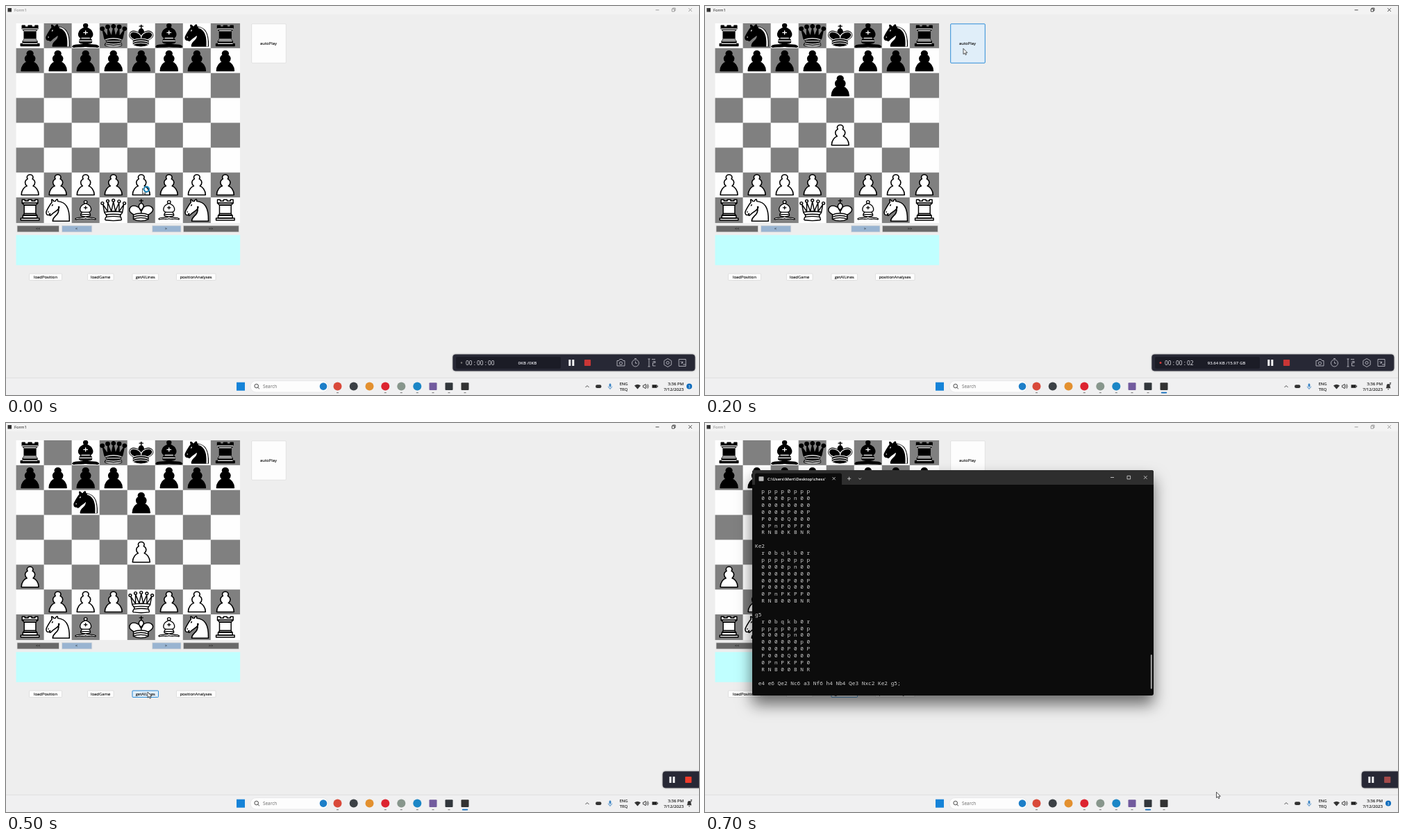
Write an HTML page that moves like this. It is 998x561 px and loops after 800 ms.

```html
<!DOCTYPE html>
<html lang="en">
<head>
<meta charset="utf-8">
<title>Form1</title>
<style>
  html, body { margin: 0; width: 100%; height: 100%; overflow: hidden; background: #eee; }
  svg { display: block; }
  text { font: 5.9px "Open Sans", "Noto Sans", sans-serif; fill: #111; white-space: pre; }
  .mid { text-anchor: middle; }
  .end { text-anchor: end; }
  .label { stroke: #111; stroke-width: .12; }
  .small { font-size: 6.1px; }
  .line { fill: none; stroke: #222; stroke-width: .8; }
  .btn { fill: #fdfdfd; stroke: #d2d2d2; stroke-width: .6; }
  .hot { fill: #e0eef9; stroke: #0078d4; stroke-width: .8; }
  .focus { fill: none; stroke: #0078d4; stroke-width: .6; }
  .inner { fill: none; stroke: #f4f8fc; stroke-width: .6; }
  .dark { fill: #696969; }
  .blue { fill: #99b4d1; }
  .bar { fill: #272835; stroke: #4a4b55; stroke-width: .4; filter: drop-shadow(0 .5px 1px rgba(0,0,0,.4)); }
  .tool { fill: none; stroke: #c9cad2; stroke-width: .8; }
  .bar-text { fill: #e8e8ee; font-size: 6.1px; font-weight: 600; text-anchor: middle; }
  .clock { fill: #e8e8ee; font-size: 8.3px; }
  .piece { stroke: #000; stroke-width: 1.5; stroke-linecap: round; stroke-linejoin: round; }
  .white { fill: #fff; }
  .black { fill: #000; }
  .trim { fill: none; }
  .black .trim { stroke: #fff; stroke-width: 1.2; }
  .black .glint { fill: #fff; stroke: none; }
  .white .glint { display: none; }
  .term { filter: drop-shadow(0 13px 11px rgba(0,0,0,.55)); }
  .term .line { stroke: #ddd; }
  .term .tab { fill: #fff; font-weight: 600; font-size: 5.8px; }
  #output text { font: 7.78px "Noto Sans Mono", "DejaVu Sans Mono", monospace; fill: #d2d2d2; }
</style>
</head>
<body>
<svg width="998" height="561" viewBox="0 0 998 561">
  <defs>
    <path id="arrow" d="M0 0V8.2L1.9 6.5 3.2 9.3 4.5 8.7 3.3 6H5.8Z" fill="#fff" stroke="#111" stroke-width=".7"/>
    <path id="pause" d="M-4-4.5h3v9h-3zM1-4.5h3v9h-3z" fill="#f4f4f6"/>
    <rect id="stop" x="-4.6" y="-4.5" width="9.2" height="9" rx=".8"/>
    <g id="camera" class="tool"><path d="M-5.5-3h2.5l1.3-2h3.4l1.3 2h2.5v7.5h-11z"/><circle cy=".7" r="2.1"/></g>
    <g id="timer" class="tool"><circle cy=".5" r="5"/><path d="M0-2V.7H2.4M-1.5-6H1.5"/></g>
    <path id="controls" d="M935.5 5.8h5M983 3.2l4.8 4.8M987.8 3.2L983 8M959 4.2h3.7v3.7H959zM960.2 4V3h3.7v3.7h-1"/>
  </defs>

  <rect width="998" height="561" fill="#eee"/>
  <rect width="998" height="12" fill="#f3f3f3"/>
  <rect x="2.5" y="3" width="5.5" height="5.5" fill="#333"/>
  <g data-on="017"><text x="12" y="8" style="fill:#777">Form1</text><use href="#controls" class="line" style="stroke:#888"/></g>
  <g data-on="23456"><text x="12" y="8">Form1</text><use href="#controls" class="line"/></g>

  <g id="board"></g>

  <rect class="btn" x="353.7" y="25.8" width="49.6" height="56.4" rx="1"/>
  <rect class="hot" data-on="2" x="353.7" y="25.8" width="49.6" height="56.4" rx="1"/>
  <text class="mid label" x="378" y="56.2">autoPlay</text>

  <g stroke="#dcdcdc" stroke-width=".8">
    <rect class="dark" x="16" y="316.8" width="60.5" height="9.2"/>
    <rect class="blue" x="80.5" y="316.8" width="43.3" height="9.2"/>
    <rect class="blue" x="210.7" y="316.8" width="41.3" height="9.2"/>
    <rect class="dark" x="255.3" y="316.8" width="80" height="9.2"/>
  </g>
  <g data-on="3">
    <rect class="focus" x="15.6" y="316.1" width="61.8" height="10.6" rx="1"/>
    <rect class="inner" x="16.3" y="316.8" width="60.4" height="9.2"/>
  </g>
  <g data-on="4">
    <rect class="focus" x="209.9" y="316.1" width="43" height="10.6" rx="1"/>
    <rect class="inner" x="210.6" y="316.8" width="41.6" height="9.2"/>
  </g>
  <text class="mid" x="46" y="323.4">&lt;&lt;</text>
  <text class="mid" x="101.5" y="323.4">&lt;</text>
  <text class="mid" x="230.5" y="323.4">&gt;</text>
  <text class="mid" x="295" y="323.4">&gt;&gt;</text>
  <rect x="14.5" y="330.3" width="322.7" height="43.4" fill="#c0ffff"/>

  <rect class="btn" x="33.5" y="386" width="47" height="9.5" rx="1"/>
  <rect class="btn" x="117.5" y="386" width="37.5" height="9.5" rx="1"/>
  <rect class="btn" x="182" y="386" width="37.5" height="9.5" rx="1"/>
  <rect class="btn" x="245.5" y="386" width="56.5" height="9.5" rx="1"/>
  <rect class="hot" data-on="5" x="182" y="386" width="37.5" height="9.5" rx="1"/>
  <rect class="focus" data-on="67" x="182" y="386" width="37.5" height="9.5" rx="1"/>
  <text class="mid label" x="57" y="392.8">loadPosition</text>
  <text class="mid label" x="136.2" y="392.8">loadGame</text>
  <text class="mid label" x="200.7" y="392.8">getAlLines</text>
  <text class="mid label" x="273.5" y="392.8">positionAnalyses</text>

  <!-- console window -->
  <g data-on="7">
    <g class="term">
      <rect x="68" y="68" width="578" height="325" rx="3" fill="#0c0c0c"/>
      <path d="M68 89V71q0-3 3-3H643q3 0 3 3V89Z" fill="#2e2e2e"/>
      <path d="M72 89V75q0-2.5 2.5-2.5H194.5q2.5 0 2.5 2.5V89Z" fill="#0c0c0c"/>
      <rect x="77.5" y="77.2" width="7" height="6.5" rx=".8" fill="#b8b8b8"/>
      <text class="tab" x="90" y="82.7">C:\Users\Mert\Desktop\chess'</text>
      <path class="line" d="M183.5 78l4.2 4.2M187.7 78l-4.2 4.2M205 80.2h5.2M207.6 77.6v5.2M221.3 79.5l1.8 1.8 1.8-1.8M584 78.5h5M608 76.3h4.6v4.6H608zM632 76.2l4.6 4.6M636.6 76.2L632 80.8"/>
      <rect x="641.8" y="334" width="2" height="49.5" rx="1" fill="#a0a0a0"/>
    </g>
    <g id="output"></g>
  </g>

  <!-- recorder bar -->
  <g data-on="0123">
    <rect class="bar" x="643.5" y="502.6" width="348.7" height="23.6" rx="4"/>
    <rect x="648" y="506" width="151" height="17" rx="2" fill="#1b1c26"/>
    <circle data-on="0" cx="656" cy="514.5" r="1.2" fill="#777"/>
    <circle data-on="123" cx="656" cy="514.5" r="1.5" fill="#d83a3a"/>
    <g id="status"></g>
    <use href="#pause" x="814.3" y="514.5"/>
    <use href="#stop" x="837.5" y="514.5" fill="#c93636"/>
    <use href="#camera" x="885.5" y="514.5"/>
    <use href="#timer" x="906.5" y="514.5"/>
    <path class="tool" d="M926 509v11M924.5 509h3M924.5 520h3M930 509.5h5M931.5 512.5h3.5v2h-3.5v4.5h4M953 508.5l5.2 3v6l-5.2 3-5.2-3v-6zM969 509.5h10v10h-10zM971.5 512l3 3M974.5 512.5v2.5h-2.5M975 517h4"/>
    <circle class="tool" cx="953" cy="514.5" r="2"/>
  </g>
  <g data-on="4">
    <rect class="bar" x="898.8" y="502.6" width="106" height="23.6" rx="4"/>
    <use href="#pause" x="912.5" y="514.5"/>
    <use href="#stop" x="936" y="514.5" fill="#ee3b2b"/>
    <use href="#camera" x="965" y="514.5"/>
    <use href="#timer" x="986" y="514.5"/>
  </g>
  <g data-on="567">
    <rect class="bar" x="945.8" y="502.6" width="60" height="23.6" rx="4"/>
    <use href="#pause" x="959.3" y="514.5"/>
    <use href="#stop" data-on="56" x="982.7" y="514.5" fill="#ee3b2b"/>
    <use href="#stop" data-on="7" x="982.7" y="514.5" fill="#a34a4a"/>
  </g>

  <!-- taskbar -->
  <rect y="536" width="998" height="25" fill="#f0f0f1"/>
  <path d="M0 536.3H998" stroke="#d9d9da" stroke-width=".7"/>
  <rect x="332" y="542.7" width="12" height="12" fill="#1583d8"/>
  <rect x="352" y="540.5" width="112" height="16.5" rx="8.2" fill="#fdfdfd" stroke="#e2e2e4" stroke-width=".7"/>
  <g class="line"><circle cx="360.7" cy="548" r="2.8"/><path d="M362.7 550l2.3 2.3"/></g>
  <text x="370" y="551" style="font-size:6.4px;fill:#666">Search</text>
  <circle cx="457" cy="548.6" r="5.3" fill="#1c7ec8"/>
  <g id="apps"></g>
  <rect data-on="23456" x="656.8" y="556.8" width="8.4" height="1.7" rx=".8" fill="#0f6cbd"/>
  <rect data-on="7" x="633.8" y="556.8" width="8.4" height="1.7" rx=".8" fill="#0f6cbd"/>

  <path class="line" d="M834.5 550l2.5-2.5 2.5 2.5"/>
  <rect x="849" y="546.3" width="8.5" height="4.8" rx="2.4" fill="#333"/>
  <rect x="868.6" y="544.5" width="2.8" height="5" rx="1.4" fill="#3a83c4"/>
  <path d="M867.3 548.5q0 2.8 2.7 2.8t2.7-2.8M870 551.3v1.7" class="line" style="stroke:#3a83c4"/>
  <text class="mid label" x="889.5" y="546.8">ENG</text>
  <text class="mid label" x="889.5" y="555">TRQ</text>
  <path d="M909.5 552.5l-4.5-5q4.5-3.6 9 0z" fill="#333"/>
  <path d="M917.5 547h1.5l2-2v7l-2-2h-1.5zM922.5 546.5q1.5 2 0 4M924 545.3q2.4 3.2 0 6.4" class="line"/>
  <path d="M930.5 546.3h7v4.5h-7zM938 547.5h1v2h-1z" fill="#222"/>
  <text class="end label small" x="976" y="546.8">3:36 PM</text>
  <text class="end label small" x="976" y="554.8">7/12/2023</text>
  <g data-on="07"><circle cx="984" cy="548.5" r="4" fill="#0f6cbd"/><text class="mid" x="984" y="550.5" style="fill:#fff;font-size:5.3px">3</text></g>
  <g data-on="123456"><path d="M980.5 551.3q1-1.2 1-3 0-3.3 2.5-3.3t2.5 3.3q0 1.8 1 3z" fill="#333"/><path class="line" d="M983 552.8h2M985.8 543.5h2l-2 2.2h2"/></g>

  <g id="cursors"></g>
</svg>
<script>
const $ = id => document.getElementById(id);

// Piece shapes on a 45-unit square; box is the inked area.
const dots = (r, list) => list.map(([x, y]) =>
  `M${x - r} ${y}a${r} ${r} 0 1 1 ${2 * r} 0a${r} ${r} 0 1 1 ${-2 * r} 0z`).join('');
const queenBase = 'M9 26c0 2 1.5 2 2.5 4 1 1.5 1 1 .5 3.5-1.5 1-1.5 2.5-1.5 2.5-1.5 1.5.5 2.5.5 2.5 6.5 1 16.5 1 23 0 0 0 1.5-1 0-2.5 0 0 .5-1.5-1-2.5-.5-2.5-.5-2 .5-3.5 1-2 2.5-2 2.5-4-8.5-1.5-18.5-1.5-27 0z';
const shapes = {
  p: { box: [10.25, 8.25, 24.5, 32],
    body: 'M22.5 9c-2.21 0-4 1.79-4 4 0 .89.29 1.71.78 2.38C17.33 16.5 16 18.59 16 21c0 2.03.94 3.84 2.41 5.03C15.41 27.09 11 31.58 11 39.5H34c0-7.92-4.41-12.41-7.41-13.47C28.06 24.84 29 23.03 29 21c0-2.41-1.33-4.5-3.28-5.62.49-.67.78-1.49.78-2.38 0-2.21-1.79-4-4-4z' },
  r: { box: [8.25, 8.25, 28.5, 31.5],
    body: 'M9 39h27v-3H9zM12 36v-4h21v4zM12.5 32l1.5-2.5h17l1.5 2.5zM14 29.5V17h17v12.5zM14 17l-3-3h23l-3 3zM11 14V9h4v2h5V9h5v2h5V9h4v5z',
    trim: 'M12 35.7h21M13 31.7h19M14 29.5h17M14 16.7h17M11 14h23' },
  n: { box: [5.25, 6.25, 33.5, 33.5],
    body: 'M22 10c10.5 1 16.5 8 16 29H15c0-9 10-6.5 8-21M24 18c.38 2.91-5.55 7.37-8 9-3 2-2.82 4.34-5 4-1.042-.94 1.41-3.04 0-3-1 0 .19 1.23-1 2-1 0-4.003 1-4-4 0-2 6-12 6-12s1.89-1.9 2-3.5c-.73-.994-.5-2-.5-3 1-1 3 2.5 3 2.5h2s.78-1.992 2.5-3c1 0 1 3 1 3',
    trim: 'M8.8 25.5h.4M14.2 16.3l.7-1.2',
    glint: 'M24.55 10.4l-.45 1.45.5.15c3.15 1 5.65 2.49 7.9 6.75S35.75 29.06 35.25 39l-.05.5h2.25l.05-.5c.5-10.06-.88-16.85-3.25-21.34-2.37-4.49-5.79-6.64-9.19-7.16z' },
  b: { box: [5.25, 4.75, 34.5, 35],
    body: 'M9 36c3.39-.97 10.11.43 13.5-2 3.39 2.43 10.11 1.03 13.5 2 0 0 1.65.54 3 2-.68.97-1.65.99-3 .5-3.39-.97-10.11.46-13.5-1-3.39 1.46-10.11.03-13.5 1-1.35.49-2.32.47-3-.5 1.35-1.94 3-2 3-2zM15 32c2.5 2.5 12.5 2.5 15 0 .5-1.5 0-2 0-2 0-2.5-2.5-4-2.5-4 5.5-1.5 6-11.5-5-15.5-11 4-10.5 14-5 15.5 0 0-2.5 1.5-2.5 4 0 0-.5.5 0 2z' + dots(2.5, [[22.5, 8]]),
    trim: 'M17.5 26h10M15 30h15M22.5 15.5v5M20 18h5' },
  q: { box: [2.5, 4.5, 40, 36],
    body: dots(2.75, [[6, 12], [14, 9], [22.5, 8], [31, 9], [39, 12]]) +
      'M9 26c8.5-1.5 21-1.5 27 0l2.5-12.5L31 25l-.3-14.1-5.2 13.6-3-14.5-3 14.5-5.2-13.6L14 25 6.5 13.5z' + queenBase,
    trim: 'M11 29a35 35 0 0 1 23 0M12.5 31.5h20M11.5 34.5a35 35 0 0 0 22 0M11 37.2a35 35 0 0 0 23 0' },
  Q: { box: [3.25, 4.75, 38.5, 35.25],
    body: dots(2, [[6, 12], [14, 8.5], [22.5, 7.5], [31, 9], [39, 12]]) +
      'M9 26c8.5-1.5 21-1.5 27 0l2-12-7 11V11l-5.5 13.5-3-15-3 15-5.5-14V25L7 14z' + queenBase,
    trim: 'M11.5 30c3.5-1 18.5-1 22 0M12 33.5c6-1 15-1 21 0' },
  k: { box: [4.8, 5.25, 35.4, 35.2],
    body: 'M22.5 11.63V6M20 8h5M22.5 25s4.5-7.5 3-10.5c0 0-1-2.5-3-2.5s-3 2.5-3 2.5c-1.5 3 3 10.5 3 10.5M11.5 37c5.5 3.5 15.5 3.5 21 0v-7s9-4.5 6-10.5c-4-6.5-13.5-3.5-16 4V27v-3.5c-3.5-7.5-13-10.5-16-4-3 6 5 10 5 10z',
    trim: 'M11.5 30c5.5-3 15.5-3 21 0M11.5 33.5c5.5-3 15.5-3 21 0M11.5 37c5.5-3 15.5-3 21 0',
    rim: 'M32 29.5s8.5-4 6.03-9.65C34.15 14 25 18 22.5 24.5v2.1-2.1C20 18 9.906 14 6.997 19.85c-2.497 5.65 4.853 9 4.853 9' }
};
// Place inside the square: x, y, width, height.
const fit = {
  p: [6.8, 3.2, 26.5, 30.3], P: [6.8, 2.3, 26.5, 30.8],
  r: [6, 2.5, 28, 30.7], R: [6, 2.4, 28, 31.3],
  n: [2.6, 1.4, 34.7, 32.3], N: [2.5, 1.9, 35, 33],
  b: [.5, 0, 39, 35.3], B: [4.5, 4, 31, 28.5],
  q: [.6, 1, 39, 33], Q: [1.5, 1.8, 37, 32.3],
  k: [2, 1.7, 36, 31.8], K: [2, 2.3, 36, 32.3]
};
const cellW = 40.04, cellH = 35.87;
const colX = c => 14.55 + cellW * c;
const rowY = r => 24.95 + cellH * r;

function pieceSvg(ch, r, c, on) {
  const low = ch.toLowerCase(), black = ch === low;
  const s = shapes[ch] || shapes[low];
  const [x, y, w, h] = fit[ch], [bx, by, bw, bh] = s.box;
  const left = colX(c) + x + (c === 7 ? 1 : 0);
  const part = (d, cls) => d ? `<path class="${cls}" d="${d}"/>` : '';
  return `<g class="piece ${black ? 'black' : 'white'}" data-on="${on}" transform="translate(${left} ${rowY(r) + y}) scale(${w / bw} ${h / bh}) translate(${-bx} ${-by})">` +
    part(s.body, 'body') + part(s.trim, 'trim') + (black ? part(s.rim, 'trim') : '') + part(s.glint, 'glint') + '</g>';
}

const positions = {
  '01': 'rnbqkbnr/pppppppp/8/8/8/8/PPPPPPPP/RNBQKBNR',
  '2': 'rnbqkbnr/pppp1ppp/4p3/8/4P3/8/PPPP1PPP/RNBQKBNR',
  '3': 'r1bqkb1r/pppp1p1p/8/8/8/8/PPPP1PP1/RNBQKBNR',
  '4567': 'r1bqkbnr/pppp1ppp/2n1p3/8/4P3/P7/1PPPQPPP/RNB1KBNR'
};
const placed = {};
for (const steps of Object.keys(positions).sort()) {
  positions[steps].split('/').forEach((row, r) => {
    [...row.replace(/\d/g, n => '.'.repeat(n))].forEach((ch, c) => {
      if (ch !== '.') placed[ch + r + c] = (placed[ch + r + c] || '') + steps;
    });
  });
}
let board = '<rect x="14.55" y="24.95" width="322.5" height="288" fill="#fefefe"/>';
for (let r = 0; r < 8; r++) for (let c = 0; c < 8; c++) if ((r + c) % 2) {
  board += `<rect x="${colX(c)}" y="${rowY(r)}" width="${c === 7 ? 42.2 : cellW}" height="${r === 7 ? 36.9 : cellH}" fill="#808080"/>`;
}
for (const [key, on] of Object.entries(placed)) board += pieceSvg(key[0], +key[1], +key[2], on);
$('board').innerHTML = board;

// Console output: board rows are spaced out, other lines stay as they are.
const lines = ['pppp0ppp', '0000pn00', '00000000', '0000P00P', 'P000Q000', '0PnP0PP0', 'RNB0KBNR', '',
  'Ke2', 'r0bqkb0r', 'pppp0ppp', '0000pn00', '00000000', '0000P00P', 'P000Q000', '0PnPKPP0', 'RNB00BNR', '',
  'g5', 'r0bqkb0r', 'pppp0p0p', '0000pn00', '000000p0', '0000P00P', 'P000Q000', '0PnPKPP0', 'RNB00BNR', '',
  ' e4 e6 Qe2 Nc6 a3 Nf6 h4 Nb4 Qe3 Nxc2 Ke2 g5;'];
$('output').innerHTML = lines.map((s, i) =>
  `<text x="72" y="${101.2 + 9.87 * i}">${s.length === 8 ? '  ' + [...s].join(' ') : s}</text>`).join('');

const status = [['00', '0KB /0KB'], ['01', '46.32 KB /15.97 GB'], ['02', '93.64 KB /15.97 GB'], ['04', '142.91 KB /15.97 GB']];
$('status').innerHTML = status.map(([sec, size], i) =>
  `<g data-on="${i}"><text class="clock" x="662" y="517.5">00 : 00 : ${sec}</text><text class="bar-text" x="751" y="516.8">${size}</text></g>`).join('');

// Taskbar: x, colour, round, running
const apps = [[477.5, '#d9493a', 1, 1], [500.7, '#3b4045', 1, 0], [523.5, '#e3902f', 1, 0], [546.3, '#dd2430', 1, 1],
  [569.3, '#87968c', 1, 1], [592.3, '#1b86c6', 1, 1], [615, '#725b9e', 0, 1], [638, '#32373c', 0, 1], [661, '#333', 0, 1]];
$('apps').innerHTML = apps.map(([x, fill, round, run]) =>
  (round ? `<circle cx="${x}" cy="548.6" r="6" fill="${fill}"/>`
    : `<rect x="${x - 5.5}" y="543.2" width="11" height="10.8" rx="1" fill="${fill}"/>`) +
  (run ? `<rect x="${x - 1.6}" y="557" width="3.2" height="1.3" rx=".6" fill="#8a8a8a"/>` : '')).join('');

const tips = [[196.5, 263], [290, 165], [372, 61.3], [63.5, 320], [219.7, 359], [204, 388], [668.7, 497.3], [736.5, 532.3]];
$('cursors').innerHTML = tips.map(([x, y], i) => `<use href="#arrow" x="${x}" y="${y}" data-on="${i}"/>`).join('') +
  '<circle data-on="0" cx="202.3" cy="264.3" r="3.7" fill="none" stroke="#1582b8" stroke-width="2"/>';

// Each data-on value lists the 100 ms steps in which the element shows.
const sets = new Set([...document.querySelectorAll('[data-on]')].map(el => el.dataset.on));
const sheet = document.createElement('style');
sheet.textContent = [...sets].map(set => {
  const keys = [...'01234567'].map(i => `${i * 12.5}%{visibility:${set.includes(i) ? 'visible' : 'hidden'}}`).join('');
  return `@keyframes on${set}{${keys}}[data-on="${set}"]{animation:on${set} .8s step-end infinite}`;
}).join('\n');
document.head.append(sheet);
</script>
</body>
</html>
```
